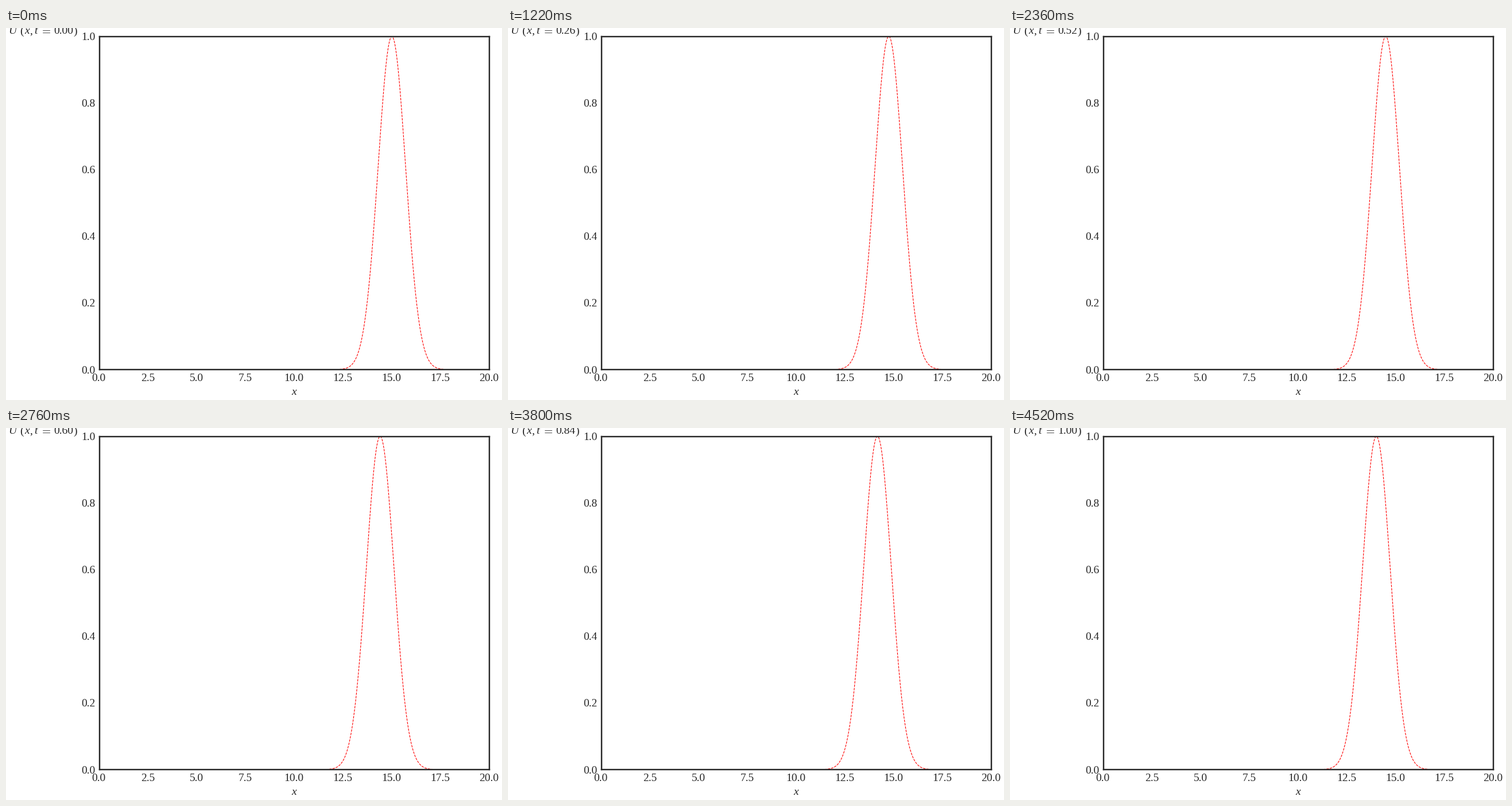
Animation, 864 px wide and 648 px high, one loop 4620 ms. Source, as a matplotlib script:

```python
import numpy as np
import matplotlib.pyplot as plt
from matplotlib.animation import FuncAnimation

W, H, DPI = 864, 648, 100
LEFT, RIGHT, TOP, BOTTOM = 162.5, 842, 14.5, 595
INK = "0.15"
SIZE = 14
EM = SIZE * DPI / 72

TICK_MS = 20
STEPS = 51
BRIEF = {5, 13, 22, 31, 39, 48}  # steps held for a single tick

plt.rcParams["font.family"] = "Liberation Serif"
plt.rcParams["mathtext.fontset"] = "cm"

fig = plt.figure(figsize=(W / DPI, H / DPI), dpi=DPI, facecolor="white")
ax = fig.add_axes([LEFT / W, 1 - BOTTOM / H,
                   (RIGHT - LEFT) / W, (BOTTOM - TOP) / H])
ax.set(xlim=(0, 20), ylim=(0, 1), xticks=[], yticks=[])
for spine in ax.spines.values():
    spine.set(linewidth=1.75, color=INK)


def write(x, baseline, text, style="normal"):
    """Place text with its pen start at a pixel position."""
    return fig.text(x / W, 1 - baseline / H, text, fontsize=SIZE, color=INK,
                    style=style, ha="left", va="baseline")


def pen_width(label):
    return EM * (0.5 * (len(label) - 1) + 0.25)


for v in np.linspace(0, 20, 9):
    label = f"{v:.1f}"
    px = LEFT + (RIGHT - LEFT) * v / 20
    write(px - pen_width(label) / 2 - 0.6, 615, label)

for v in np.linspace(0, 1, 6):
    py = BOTTOM - (BOTTOM - TOP) * v
    write(131.3, py + 6.5, f"{v:.1f}")

write(497, 639, "x", "italic")

TITLE_Y = 10.5
for px, part in ((4, "U"), (32, "x"), (49, "t")):
    write(px, TITLE_Y, part, "italic")
for px, part in ((24.5, "("), (41, ","), (59, "$=$"), (117, ")")):
    write(px, TITLE_Y, part)
clock = write(83.3, TITLE_Y, "0.00")

x = np.linspace(0, 20, 1000)
wave, = ax.plot(x, np.exp(-(x - 15) ** 2), "r--", linewidth=0.8)

timeline = [k for k in range(STEPS)
            for _ in range(1 if k in BRIEF else 5)]


def update(i):
    t = timeline[i] / (STEPS - 1)
    wave.set_ydata(np.exp(-(x - 15 + t) ** 2))
    clock.set_text(f"{t:.2f}")
    return wave, clock


anim = FuncAnimation(fig, update, frames=len(timeline), interval=TICK_MS,
                     repeat=True, repeat_delay=0, blit=False)
plt.show()
```
